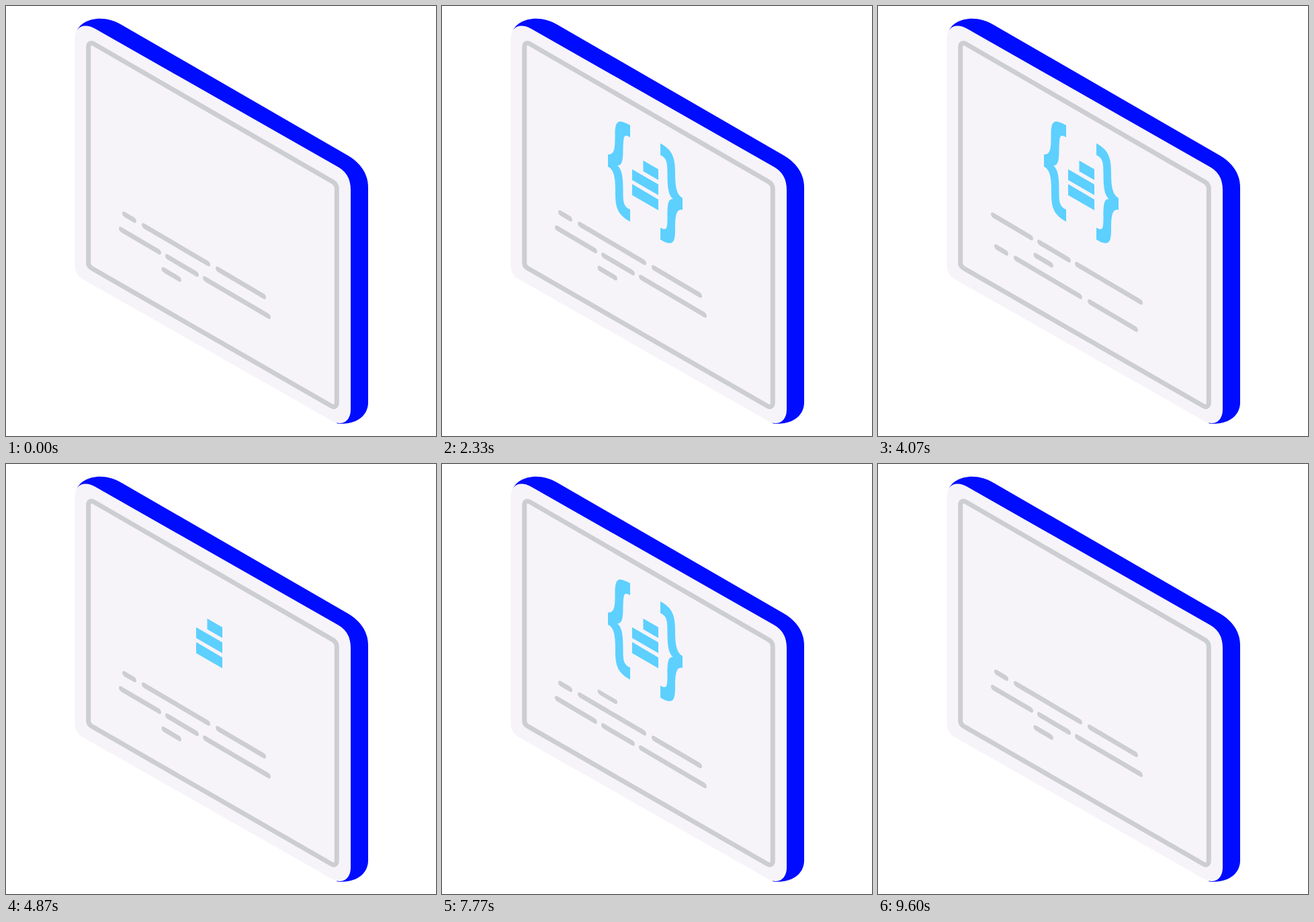
These frames come from a looping animation (640 px wide and 640 px high, 9.63 s). An HTML page:

```html
<!DOCTYPE html>
<html lang="en">
<head>
<meta charset="utf-8">
<title>Code board</title>
<style>
  html, body { margin: 0; width: 100%; height: 100%; overflow: hidden; background: #fff; }
  svg { display: block; width: 100%; height: 100%; }
  .edge { fill: #000cff; }
  .face { fill: #f6f4f9; }
  .frame { fill: none; stroke: #cdced0; stroke-width: 7; }
  .line { fill: #cdced0; }
  .icon { fill: #5dd0ff; }
</style>
</head>
<body>
<svg viewBox="0 0 640 640">
  <defs>
    <clipPath id="window"><rect x="160" y="198.5" width="242" height="68.7"/></clipPath>
  </defs>

  <path class="edge" d="M105 39.5C109 21 142 10 172 28L508 222C527 233 539 249 539 270V590C539 612 518 624 493 621.5L470 590L120 60Z"/>
  <path class="face" d="M102.5 48C102.5 31 116 24 133 34L495 240C507 247 513 258 513 274V601C513 617 501 626 486 618L114 406.5Q102.5 400 102.5 387Z"/>
  <path class="frame" d="M122.7 61C122.7 56 126 53.8 130.5 56.3L486 261.5Q492.3 265 492.3 272V590C492.3 596 489 598 484.5 595.5L128 390.5Q122.7 387.5 122.7 382Z"/>

  <g class="icon" id="braces">
    <path d="M280 177.5Q270 172 265 172C259 172 257.5 180 257.5 190C257.5 208 258 222 247 221V239C258 244 258 262 258 280C258 300 262 311 280 321V303C271 299 269.5 293 269.5 279C269.5 258 269 244 261 237.5C269 238 269.5 226 269.5 212C270 200 270 193 274 193Q277 193 280 195.500Z"/>
    <path d="M325 204.500C343 214 347 226 347 247C347 266 348 280 358 286V303.500C348 301 347 314 347 334C347 349 344 353 338.500 353C334 353 330 350.500 325 347.500V330C328 331.500 330 332.500 332 332C335 331.500 335.500 326 335.500 313C335.500 298 336 286 344 287.500C336 281 335.500 266 335.500 248C335.500 232 334 226 325 222Z"/>
  </g>
  <path class="icon" id="bars" d="M299.500 230L322 243V259L299.500 246ZM283 243L322 265.500V281.500L283 259ZM283 265L322 288V304L283 281.500Z"/>

  <g transform="matrix(1 .588 0 1 0 0)">
    <g clip-path="url(#window)"><g class="line" id="text"></g></g>
  </g>
</svg>
<script>
  const LOOP = 9630;
  const SCROLL = { period: 2400, travel: 70 };
  const BLINK_PERIOD = 3200;
  const RADIUS = 4;

  // Each row: vertical centre in the skewed plane, then [left, right] of its pills.
  const rows = [
    { y: 206.5, pills: [[173, 194], [202, 304], [312, 387]] },
    { y: 232, pills: [[168, 231], [237, 287], [293, 394]] },
    { y: 254.8, pills: [[231.5, 261]] }
  ];

  // Visible spans within one blink period.
  const blinks = {
    braces: [[20, 1500], [2000, 2500]],
    bars: [[800, 2500]]
  };

  const byId = id => document.getElementById(id);
  const text = byId('text');

  function addPill(left, right, y) {
    const pill = document.createElementNS('http://www.w3.org/2000/svg', 'rect');
    const attrs = { x: left, y: y - RADIUS, width: right - left, height: 2 * RADIUS, rx: RADIUS };
    for (const key in attrs) pill.setAttribute(key, attrs[key]);
    text.append(pill);
  }

  // Two stacked copies make the scroll seamless.
  for (const shift of [0, -SCROLL.travel]) {
    for (const { y, pills } of rows) {
      for (const [left, right] of pills) addPill(left, right, y + shift);
    }
  }

  function draw(time) {
    const t = time % LOOP;
    const offset = (t % SCROLL.period) / SCROLL.period * SCROLL.travel;
    text.setAttribute('transform', `translate(0 ${offset})`);

    const phase = t % BLINK_PERIOD;
    for (const id in blinks) {
      const shown = blinks[id].some(([from, to]) => phase >= from && phase < to);
      byId(id).setAttribute('visibility', shown ? 'visible' : 'hidden');
    }
  }

  const start = performance.now();
  function tick() {
    draw(performance.now() - start);
    requestAnimationFrame(tick);
  }
  tick();
</script>
</body>
</html>
```
